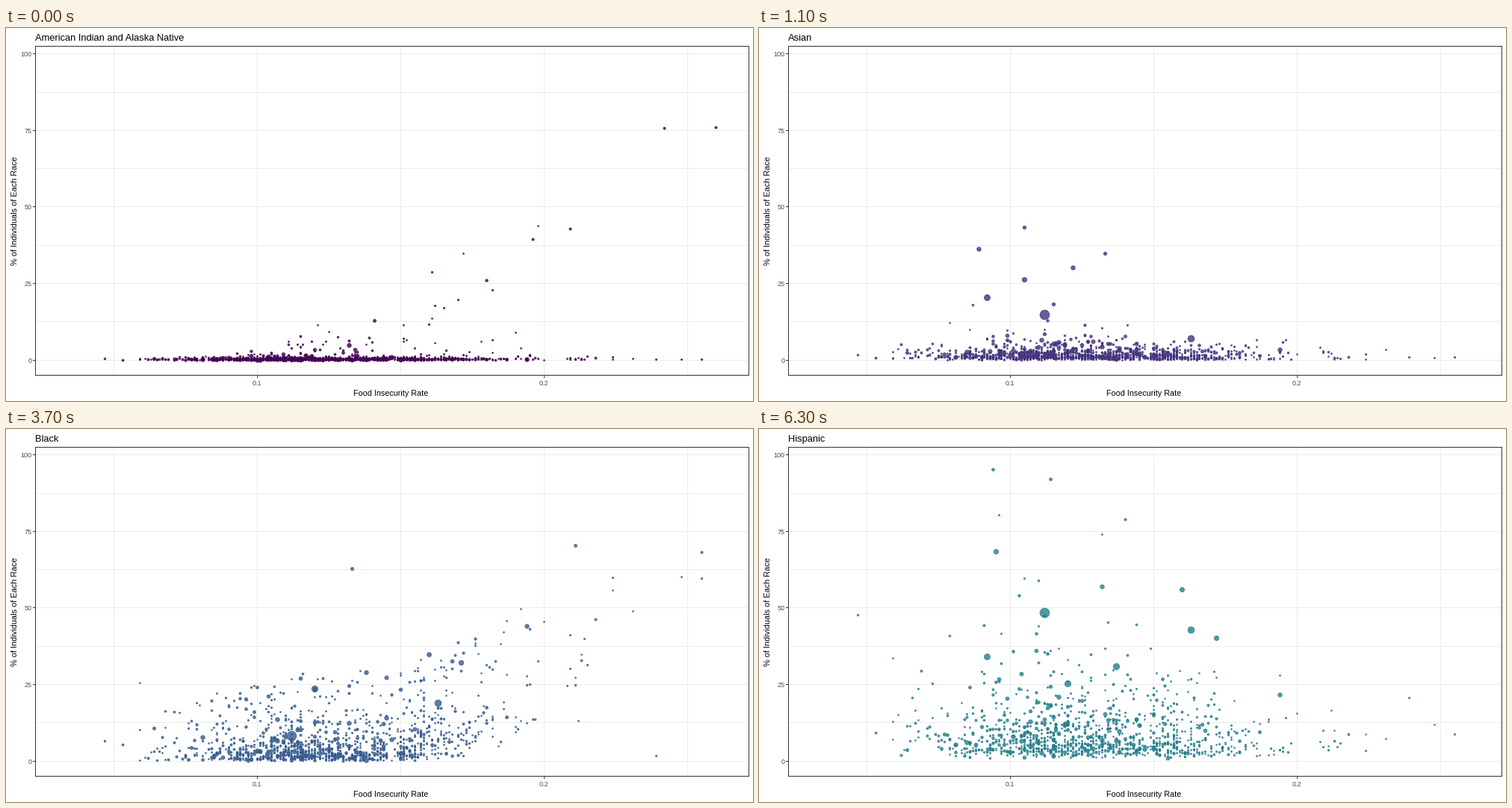
A matplotlib script that plays this animation: 1000x500 px, repeating every 8 s.

```python
import numpy as np
import matplotlib.pyplot as plt
from matplotlib.animation import FuncAnimation
from matplotlib.patches import Rectangle

W, H, DPI = 1000, 500, 100
PT = 72 / DPI
STEP = 100          # ms per frame
LOOP = 8000
FADE_STARTS = [500, 3100, 5700]
FADE_STEP = 200     # the fade advances in quarters

RACES = ["American Indian and Alaska Native", "Asian", "Black", "Hispanic"]
COLORS = ["#440154", "#46337E", "#365C8D", "#277F8E"]
ALPHA = 0.8

# A few landmarks per race: rate in thousandths, share in %, radius in px
LANDMARKS = [
    [(242, 75.8, 2), (260, 76, 2), (209, 43, 2), (196, 39.6, 2),
     (198, 44, 1.3), (172, 35, 1.3), (180, 26, 2.2)],
    [(112, 14.8, 6.8), (163, 7.2, 4.8), (92, 20.5, 4.4), (105, 43.3, 2.6),
     (89, 36.4, 3.2), (133, 34.8, 2.6), (122, 30.2, 3.2), (105, 26.3, 3.6)],
    [(112, 8.4, 6.8), (163, 19, 4.8), (120, 23.6, 4.6), (160, 35, 3.4),
     (171, 32.2, 3.7), (133, 63, 2.5), (211, 70.5, 2.4), (255, 68.3, 2)],
    [(112, 48.6, 6.8), (163, 43, 4.8), (92, 34.1, 4.4), (137, 31, 4.6),
     (120, 25.5, 4.6), (172, 40.3, 3.6), (160, 56, 3.5), (95, 68.5, 3.6),
     (94, 95.4, 2.3), (114, 92.2, 2.4)],
]


def px(rate):
    return 336 + 3.84 * (np.asarray(rate) - 100)


def py(share):
    return 445.2 - 4.105 * np.asarray(share)


def make_counties(rng, n=1180):
    """Rates, radii and the share of each race for all ordinary counties."""
    rate = np.where(rng.random(n) < 0.86, rng.normal(121, 25, n),
                    150 + rng.exponential(28, n))
    rate = np.round(rate[(rate > 46) & (rate < 260)])
    n = len(rate)
    radius = 1.3 + rng.exponential(np.where(rate > 150, 0.28, 0.45))
    radius = np.minimum(radius, 3.2)

    def skewed(median, sigma, cap):
        share = median * np.exp(sigma * rng.normal(size=n))
        return np.where(share > cap, cap * rng.random(n), share)

    def tail(chance, scale):
        return (rng.random(n) < chance) * rng.exponential(scale)

    middle = (rate > 95) & (rate < 200)
    native = skewed(0.35, 0.7, 3)
    native += middle * tail(0.08, np.clip(rate - 90, 1, 90) * 0.09)
    asian = skewed(0.85 * radius, 0.8, 7)
    asian += (rate < 150) * tail(0.07, np.clip(160 - rate, 1, 80) * 0.1)
    rise = np.clip((rate - 142) / 75, 0, 1.25) ** 1.5
    black = skewed(3.8 + 38 * rise, np.maximum(1.1 - 0.7 * rise, 0.3),
                   30 + 40 * np.minimum(rise, 1.1))
    hispanic = skewed(6.3, 0.8, 38) + 0.6
    hispanic += (rate < 150) * tail(0.08, np.full(n, 17))
    return rate, radius, [native, asian, black, np.minimum(hispanic, 84)]


def race_points(i, counties):
    rate, radius, shares = counties
    marks = np.array(LANDMARKS[i])
    x = np.append(rate, marks[:, 0])
    y = np.append(shares[i], marks[:, 1])
    r = np.append(radius, marks[:, 2])
    return np.round(px(x)) + 0.5, np.round(py(y)) + 0.5, r


fig = plt.figure(figsize=(W / DPI, H / DPI), dpi=DPI, facecolor="white")
ax = fig.add_axes([0, 0, 1, 1])
ax.set_xlim(0, W)
ax.set_ylim(H, 0)
ax.axis("off")


def line(xs, ys, color):
    ax.plot(xs, ys, color=color, lw=PT, antialiased=False, zorder=1,
            solid_capstyle="butt")


def label(x, y, text, size, color="black", **kw):
    return ax.text(x, y, text, fontsize=size * PT, color=color,
                   family="Liberation Sans", **kw)


LEFT, TOP, RIGHT, BOTTOM = 39, 24, 994, 465
GRID, DARK, GREY = "#EBEBEB", "#333333", "#4D4D4D"

for rate in range(50, 251, 50):
    x = round(float(px(rate)))
    line([x, x], [TOP, BOTTOM], GRID)
    if rate % 100 == 0:
        line([x, x], [BOTTOM, BOTTOM + 3], DARK)
        label(x - 0.5, 479, f"{rate / 1000:.1f}", 9, GREY, ha="center")
for k in range(9):
    share = 12.5 * k
    y = np.floor(py(share))
    line([LEFT, RIGHT], [y, y], GRID)
    if k % 2 == 0:
        line([LEFT - 3, LEFT], [y, y], DARK)
        label(34.5, y + 4, f"{share:.0f}", 9, GREY, ha="right")

ax.add_patch(Rectangle((LEFT, TOP), RIGHT - LEFT, BOTTOM - TOP, fill=False,
                       ec=DARK, lw=PT, antialiased=False, zorder=9))
title = label(39, 17, RACES[0], 12.9)
label(515.5, 493, "Food Insecurity Rate", 10.8, ha="center")
label(12, 245.5, "% of Individuals of Each Race", 11, rotation=90,
      ha="center", va="center")

counties = make_counties(np.random.default_rng(12))
clouds = []
for i, color in enumerate(COLORS):
    x, y, r = race_points(i, counties)
    clouds.append(ax.scatter(x, y, s=((2 * r - 1) * PT) ** 2, c=color,
                             edgecolors=color, linewidths=PT, zorder=3 + i))


def ease(t):
    return 4 * t ** 3 if t < 0.5 else 1 - 4 * (1 - t) ** 3


def update(frame):
    now = frame * STEP
    state = sum(now >= start for start in FADE_STARTS)
    weights = [0.0] * len(RACES)
    shown = state
    if state:
        quarter = min((now - FADE_STARTS[state - 1]) // FADE_STEP + 1, 4)
        weights[state] = ease(quarter / 4)
        weights[state - 1] = 1 - weights[state]
        if quarter < 3:
            shown = state - 1
    else:
        weights[0] = 1.0
    for cloud, weight in zip(clouds, weights):
        cloud.set_visible(weight > 0)
        cloud.set_alpha(ALPHA * weight)
    title.set_text(RACES[shown])
    return [*clouds, title]


anim = FuncAnimation(fig, update, frames=LOOP // STEP, interval=STEP,
                     init_func=lambda: update(0), repeat=True,
                     repeat_delay=0, blit=False)
plt.show()
```
